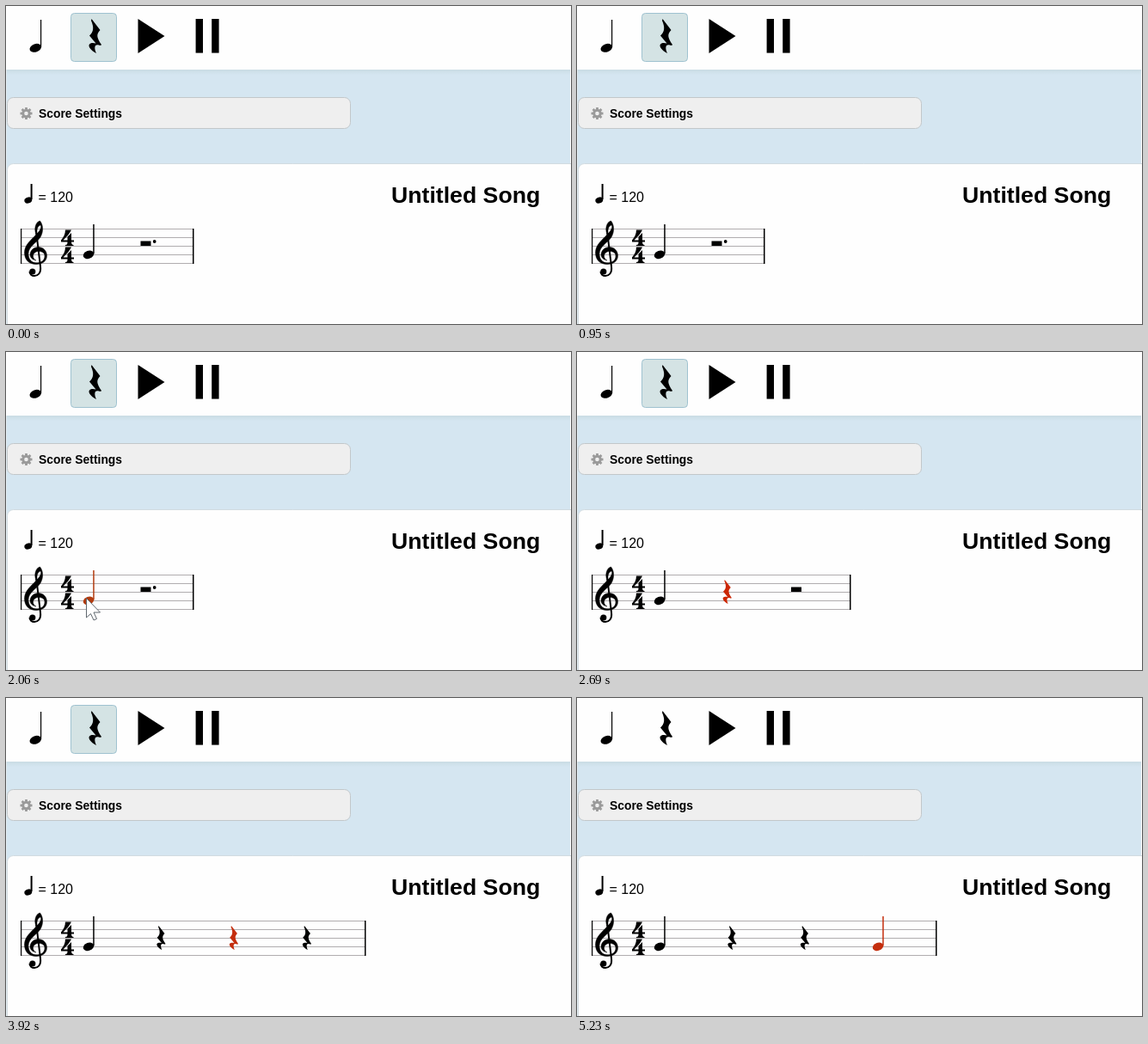
Write an HTML page with a canvas that moves like this. It is 657 by 370 pixels and loops after 5330 ms.

```html
<!DOCTYPE html>
<html lang="en">
<head>
<meta charset="utf-8">
<title>Score editor</title>
<style>
html, body { margin: 0; width: 100%; height: 100%; overflow: hidden; background: #fff; }
canvas { display: block; }
</style>
</head>
<body>
<canvas id="stage" width="657" height="370"></canvas>
<script>
const ctx = document.getElementById('stage').getContext('2d');
const LOOP = 5330;
const SANS = '"Liberation Sans", Arial, sans-serif';
const BLACK = '#000', RED = '#c42e0e';

const REST = new Path2D('M3.5 0 L13.5 13 C9 18 9 21 15 30 C14.5 31 13 31 12 30.5 C8 29 5.5 32 9 40 C3 37 -1 32 1 29.5 C3 27.5 6 28 8.5 28.5 L1 19.5 C6 15 6.5 10 3 2 Z');
const FOUR = new Path2D('M5 .5 H12 C10 5 6 9 2.5 12.5 H7.5 V8.5 L12 4 V12.5 H15 V14.5 H12 C12 17 13 18 14.5 18 V19 H5 V18 C7 18 7.5 17 7.5 14.5 H0 V12.5 C3 9 5 5 5 .5 Z');
const CLEF = new Path2D('M35 266 C32 258 35 251 39.5 250 C43 254 44 262 40 269 C36 275 26 280 26 288 C26 295 30 298.8 35 298.8 C41 299 45 296 45 291 C45 287 42 285.5 38 285.5 C34 285.5 31.5 288 31.5 291 C31.5 293.5 33 295 35 296 C30 295 27.8 292 28 289 C28.5 284 32 281 37.5 280.5 C43 280.5 47.5 284.5 47.5 290.5 C47.5 297 42 300.5 35 300.5 C27 300.5 21.5 295.5 21.5 287 C21.5 278 29 272.5 35 266 C39 262 41.5 258.5 40.5 255 C37 255.5 35 260 36.5 266 Z');
const CLEF_STEM = new Path2D('M35.3 264 L40 303 C41 311 37 314 33 314 C30 314 27.5 312 27.5 309');
const POINTER = new Path2D('M.5 .5 V23 L5.5 18.5 L9 26 L12.5 24.5 L9 17 H16.5 Z');

function box(x, y, w, h, r, fill, stroke) {
  ctx.beginPath();
  ctx.roundRect(x, y, w, h, r);
  ctx.fillStyle = fill;
  ctx.fill();
  ctx.strokeStyle = stroke;
  ctx.lineWidth = 1;
  ctx.stroke();
}

function rect(x, y, w, h, color = BLACK) {
  ctx.fillStyle = color;
  ctx.fillRect(x, y, w, h);
}

function disc(x, y, r, color = BLACK) {
  ctx.fillStyle = color;
  ctx.beginPath();
  ctx.arc(x, y, r, 0, Math.PI * 2);
  ctx.fill();
}

function shape(path, x, y, scale = 1, color = BLACK) {
  ctx.save();
  ctx.translate(x, y);
  ctx.scale(scale, scale);
  ctx.fillStyle = color;
  ctx.fill(path);
  ctx.restore();
}

function line(path, width) {
  ctx.strokeStyle = BLACK;
  ctx.lineWidth = width;
  ctx.stroke(path);
}

function label(text, x, y, font) {
  ctx.fillStyle = BLACK;
  ctx.font = `${font} ${SANS}`;
  ctx.fillText(text, x, y);
}

function note(x, y, rx, ry, stemX, stemTop, stemWidth, color = BLACK) {
  ctx.fillStyle = color;
  ctx.beginPath();
  ctx.ellipse(x, y, rx, ry, -0.35, 0, Math.PI * 2);
  ctx.fill();
  rect(stemX, stemTop, stemWidth, y - 1 - stemTop, color);
}

const scoreNote = (x, color) => note(x, 289.3, 6.4, 4.6, x + 5.2, 254, 1.5, color);
const scoreRest = (x, color) => shape(REST, x, 265, 0.7, color);
const halfRest = x => rect(x, 273.5, 12, 5.5);

function gear(x, y) {
  ctx.save();
  ctx.translate(x, y);
  for (let i = 0; i < 8; i++) {
    rect(-1.4, -7, 2.8, 4, '#9a9a9a');
    ctx.rotate(Math.PI / 4);
  }
  ctx.restore();
  disc(x, y, 5.2, '#9a9a9a');
  disc(x, y, 2.3, '#efefef');
}

function page() {
  rect(0, 0, 657, 370, '#fefefe');
  rect(0, 74, 656, 296, '#d5e6f1');
  const shade = ctx.createLinearGradient(0, 74, 0, 80);
  shade.addColorStop(0, '#c9dce4');
  shade.addColorStop(1, '#d5e6f1');
  rect(0, 74, 656, 6, shade);
  rect(0, 74, 1, 296, '#e2ebf0');
  box(1.5, 106.5, 399, 36, 7, '#efefef', '#c2c7ca');
  gear(23.5, 125);
  label('Score Settings', 38, 130, 'bold 13.87px');
  box(1.5, 183.5, 670, 200, 7, '#fefefe', '#d2dbe0');
}

function toolbar(restActive) {
  if (restActive) box(75.5, 8.5, 53, 56, 4, '#d4e3e4', '#9fc2d0');
  note(34.3, 48.8, 7, 4.7, 40, 16, 1.2);
  shape(REST, 96, 15);
  shape(new Path2D('M153.5 15 L184.5 35 L153.5 55 Z'), 0, 0);
  rect(220.6, 15, 8.4, 39.6);
  rect(239.2, 15, 8.4, 39.6);
}

function staff(end) {
  for (let y = 259; y <= 299; y += 10) rect(17, y, end - 17, 1, '#b0adaf');
  rect(17, 259, 1.2, 41);
  rect(end - 1, 259, 1.5, 41);
  shape(CLEF, 0, 0);
  line(CLEF, 0.5);
  line(CLEF_STEM, 2);
  disc(30.8, 309, 3.6);
  shape(FOUR, 64, 260);
  shape(FOUR, 64, 280);
}

function measure(t) {
  if (t < 2540) {
    staff(218);
    scoreNote(96, t >= 1820 ? '#b23c10' : BLACK);
    halfRest(156.5);
    disc(172.7, 274, 1.9);
  } else if (t < 3240) {
    staff(318);
    scoreNote(96);
    scoreRest(169.3, '#cc2806');
    halfRest(249);
  } else {
    const noteAdded = t >= 4380;
    staff(418);
    scoreNote(96);
    scoreRest(175);
    scoreRest(259.5, noteAdded ? BLACK : RED);
    if (noteAdded) scoreNote(350, RED);
    else scoreRest(344.5);
  }
}

// Keys: time, x, y of the pointer tip
const TRAIL = [[1320, 122, 301], [1420, 113, 294], [1600, 113, 294], [1950, 93, 286], [2540, 93, 286]];

function pointer(t) {
  const i = TRAIL.findIndex(key => t < key[0]);
  if (i < 1) return;
  const [t0, x0, y0] = TRAIL[i - 1], [t1, x1, y1] = TRAIL[i];
  const u = (t - t0) / (t1 - t0), k = u * u * (3 - 2 * u);
  ctx.save();
  ctx.translate(x0 + (x1 - x0) * k, y0 + (y1 - y0) * k);
  ctx.fillStyle = '#fff';
  ctx.strokeStyle = '#5f676e';
  ctx.lineWidth = 1;
  ctx.fill(POINTER);
  ctx.stroke(POINTER);
  ctx.restore();
}

function draw(now) {
  const t = now % LOOP;
  page();
  toolbar(t < 4040);
  note(25.8, 226, 4.5, 3.5, 28.6, 207, 2);
  label('= 120', 37.5, 228, '16px');
  label('Untitled Song', 448, 229, 'bold 26.67px');
  measure(t);
  pointer(t);
  requestAnimationFrame(draw);
}
requestAnimationFrame(draw);
</script>
</body>
</html>
```
